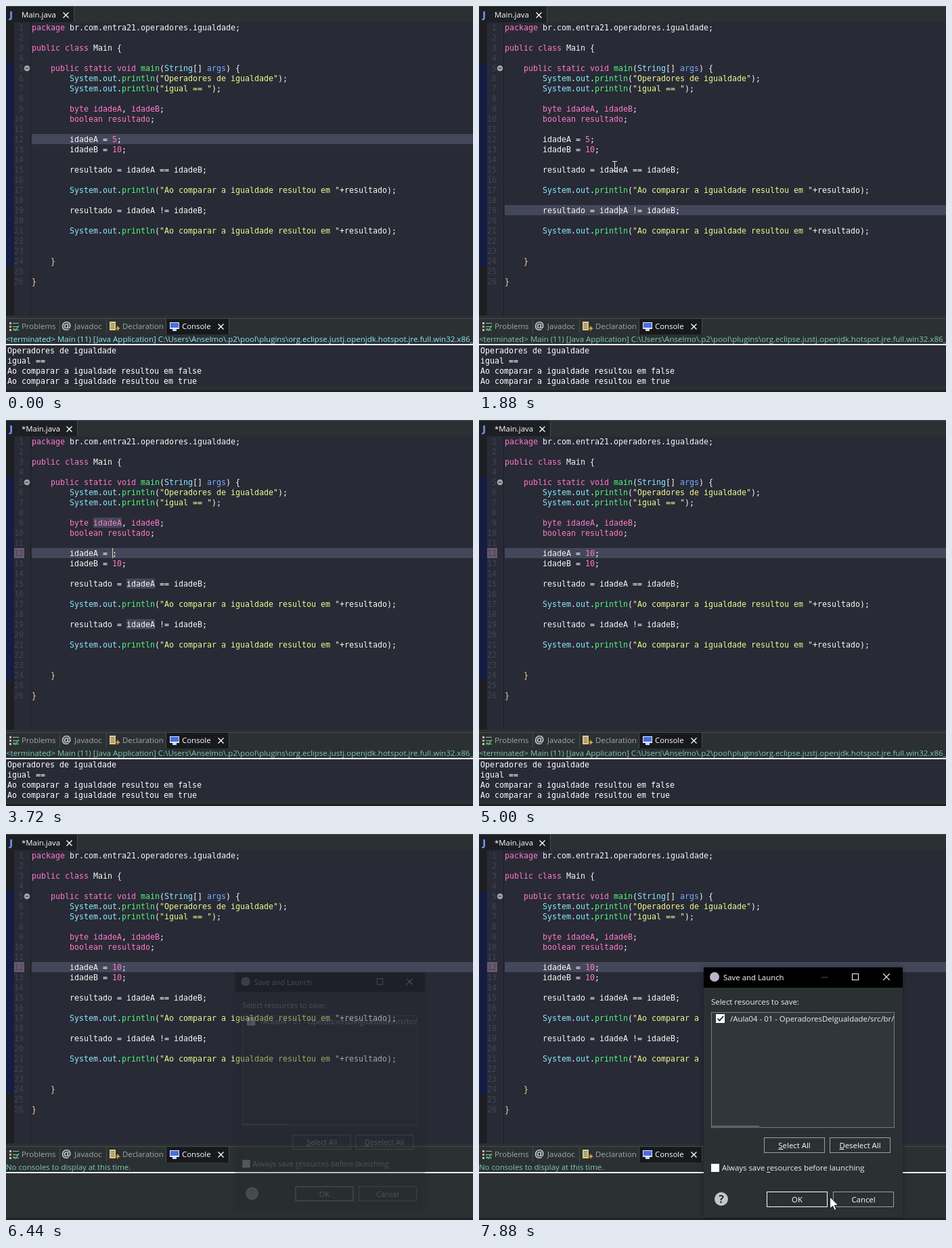
Recreate the animation shown at these times as an HTML page with a canvas. Size 690 px wide and 570 px high, loop 8000 ms.

```html
<!DOCTYPE html>
<html lang="pt">
<head>
<meta charset="utf-8">
<title>Operadores de igualdade</title>
<style>
  html, body { margin: 0; width: 100%; height: 100%; overflow: hidden; background: #2b3033; }
  canvas { display: block; }
</style>
</head>
<body>
<canvas id="stage" width="690" height="570"></canvas>
<script>
const ctx = document.getElementById('stage').getContext('2d');
const LOOP = 8000, CHAR = 7, ROW = 15, LEFT = 38, TOP = 24;
const MONO = '11.63px "DejaVu Sans Mono", monospace';
const UI = '11.4px "Open Sans", sans-serif';
const PANEL = '#2b3033', EDITOR = '#282a36', MARK = '#44475a', WHITE = '#f8f8f2', BORDER = '#464b4e';

const source = value => `package br.com.entra21.operadores.igualdade;

public class Main {

    public static void main(String[] args) {
        System.out.println("Operadores de igualdade");
        System.out.println("igual == ");

        byte idadeA, idadeB;
        boolean resultado;

        idadeA = ${value};
        idadeB = 10;

        resultado = idadeA == idadeB;

        System.out.println("Ao comparar a igualdade resultou em "+resultado);

        resultado = idadeA != idadeB;

        System.out.println("Ao comparar a igualdade resultou em "+resultado);


    }

}`.split('\n');

const output = ['Operadores de igualdade', 'igual == ',
  'Ao comparar a igualdade resultou em false', 'Ao comparar a igualdade resultou em true'];

const launched = '<terminated> Main (11) [Java Application] C:\\Users\\Anselmo\\.p2\\pool\\plugins\\' +
  'org.eclipse.justj.openjdk.hotspot.jre.full.win32.x86_64';

const PINK = '#ff79c6', CYAN = '#8be9fd', GREEN = '#50fa7b';
const tokenColor = {
  package: PINK, public: PINK, class: PINK, static: PINK, void: PINK,
  System: CYAN, out: CYAN, String: CYAN, println: GREEN, main: GREEN,
  args: '#79abff', '}': '#f5cf95'
};

// Timed states: [start, ...values]; the latest one that has started applies.
const carets = [[0], [1570, 19, 207], [2160], [2460, 12, 157], [2750, 12, 164], [3290],
  [3720, 12, 157], [3870, 12, 171], [4860], [5400, 12, 171], [5940]];
const beams = [[0], [1270, 260, 420], [1420, 225, 340], [1570, 208, 302], [1730, 205, 272],
  [1880, 200, 236], [2030, 183, 212], [2160, 168, 194], [2310, 161, 189], [2750, 164, 189],
  [3040, 165, 189], [3720], [4430, 160, 184], [4580, 122, 152], [4720, 87, 118], [4860]];
const values = [[0, '5'], [3720, ''], [3870, '10']];
const dialogs = [[0], [6440, 0.2, 0.954], [6570, 0.85, 0.99], [6710, 1, 1]];
const current = (states, t) => states.findLast(s => s[0] <= t).slice(1);

function box(x, y, w, h, color) {
  ctx.fillStyle = color;
  ctx.fillRect(x, y, w, h);
}
function frame(x, y, w, h, color) {
  ctx.strokeStyle = color;
  ctx.lineWidth = 1;
  ctx.strokeRect(x + 0.5, y + 0.5, w - 1, h - 1);
}
function text(s, x, y, color, font = UI, align = 'left') {
  ctx.font = font;
  ctx.textAlign = align;
  ctx.fillStyle = color;
  ctx.fillText(s, x, y);
}
function line(points, color, width = 1) {
  ctx.strokeStyle = color;
  ctx.lineWidth = width;
  ctx.beginPath();
  points.forEach(([x, y]) => ctx.lineTo(x, y));
  ctx.stroke();
}
function disc(x, y, r, color) {
  ctx.fillStyle = color;
  ctx.beginPath();
  ctx.arc(x, y, r, 0, Math.PI * 2);
  ctx.fill();
}
function cross(x, y, r, color = '#fff') {
  line([[x - r, y - r], [x + r, y + r]], color, 1.2);
  line([[x + r, y - r], [x - r, y + r]], color, 1.2);
}
const rowTop = row => TOP + (row - 1) * ROW;

function drawEditorTab(dirty) {
  const edge = dirty ? 105 : 100;
  box(0, 0, 690, 24, PANEL);
  box(0, 0, 690, 1, BORDER);
  box(0, 1, edge, 23, '#1c1f23');
  box(edge, 1, 1, 23, BORDER);
  text('J', 5, 18, '#7090f0', 'bold 14px "DejaVu Sans", sans-serif');
  text(dirty ? '*Main.java' : 'Main.java', 23, 17, '#fff');
  cross(dirty ? 93.5 : 88.5, 13.5, 4);
}

function drawCodeLine(s, row) {
  const declaration = /^\s*(byte|boolean)/.test(s);
  for (const m of s.matchAll(/"[^"]*"|\w+|[^\w\s]/g)) {
    const token = m[0];
    let color = tokenColor[token] || WHITE;
    if (token[0] === '"') color = '#f1fa8c';
    else if (/^\d/.test(token) || (declaration && /\w/.test(token))) color = PINK;
    text(token, LEFT + m.index * CHAR, rowTop(row) + 12, color, MONO);
  }
}

function drawEditor(t) {
  const dirty = t >= 3720;
  const activeRow = t >= 1570 && t < 2460 ? 19 : 12;
  box(0, 24, 690, 433, EDITOR);
  box(0, 24, 12, 433, '#1d1f23');
  box(0, 84, 12, 300, '#161d42');
  box(36, 24, 1, 433, '#1b1d24');
  box(LEFT, rowTop(activeRow), 652, ROW, MARK);
  if (dirty) box(12, rowTop(12), 15, ROW, '#6b5872');
  if (t >= 2460 && t < 4860)
    for (const [row, x] of [[9, 129], [15, 178], [19, 178]]) box(x, rowTop(row), 42, ROW, MARK);

  source(current(values, t)[0]).forEach((s, i) => {
    text(i + 1, 26, rowTop(i + 1) + 12, '#424550', MONO, 'right');
    drawCodeLine(s, i + 1);
  });
  disc(31, 92, 4.3, '#a5a8aa');
  box(28.5, 91.5, 5, 1, '#25272e');

  const [row, x] = current(carets, t);
  if (row) box(x, rowTop(row), 1, ROW, '#e8d9a8');
}

function drawViewIcons() {
  for (const y of [467, 472, 477]) {
    box(5, y, 3, 3, y === 472 ? '#d9b04a' : '#b9c0c4');
    box(10, y + 1, 9, 1, '#aab2b6');
  }
  line([[11, 476], [14, 479], [19, 472]], '#45b45c', 2);
  text('@', 82, 478, '#c0c8d4', 'bold 16px "Open Sans", sans-serif');
  box(153, 466, 9, 13, '#d6c48c');
  for (const y of [469, 472, 475]) box(155, y, 5, 1, '#655d45');
  line([[160, 476], [167, 476], [164, 473], [167, 476], [164, 479]], '#e0a83c', 1.5);
  box(242, 467, 14, 10, '#dfe5f5');
  box(243, 468, 12, 7, '#4a6ee0');
  box(246, 477, 6, 3, '#cfd6e8');
}

function drawConsole(t) {
  const cleared = t >= 6320;
  box(0, 457, 690, 113, PANEL);
  box(0, 461, 690, 1, BORDER);
  box(237, 462, 92, 23, '#17191c');
  for (const x of [79, 148, 236, 329]) box(x, 462, 1, 22, BORDER);
  drawViewIcons();
  text('Problems', 23, 477, '#a3a8aa');
  text('Javadoc', 101, 477, '#a3a8aa');
  text('Declaration', 172, 477, '#a3a8aa');
  text('Console', 260, 477, '#fff');
  cross(317.5, 473.5, 4);

  const status = t < 1570 ? '#8be9fd' : '#7accb6';
  if (cleared) {
    text('No consoles to display at this time.', 0, 496, status);
  } else {
    text(launched, 0, 496, status, '11.5px "Open Sans", sans-serif');
    box(0, 500, 690, 61, EDITOR);
    output.forEach((s, i) => text(s, 2, 513 + i * ROW, '#fff', MONO));
  }
  box(0, 499, 690, 2, '#f2f2f2');
  box(0, 567, 690, 3, '#1f2326');
}

function button(label, x, y, color, underlined) {
  frame(x, y, 90, 23, color);
  text(label, x + 45, y + 16, '#fff', UI, 'center');
  if (underlined) box(x + 45 - ctx.measureText(label).width / 2, y + 17, 7, 1, '#fff');
}

function drawDialog(t) {
  const [alpha, scale] = current(dialogs, t);
  if (!alpha) return;
  ctx.save();
  ctx.globalAlpha = alpha;
  ctx.translate(478.5, 381.5 - (1 - scale) * 20);
  ctx.scale(scale, scale);
  ctx.translate(-478.5, -381.5);

  ctx.save();
  ctx.shadowColor = 'rgba(0,0,0,.35)';
  ctx.shadowBlur = 8;
  box(332, 197, 294, 369, PANEL);
  ctx.restore();
  box(332, 197, 294, 30, '#000');
  disc(348, 211, 7, '#b9b5c8');
  text('Save and Launch', 361, 216, '#fff');
  box(506, 211, 10, 1, '#4a4a4a');
  frame(551, 206, 10, 10, '#fff');
  cross(602, 211, 4.8);

  text('Select resources to save:', 343, 252, '#f0f0f0');
  box(343, 263, 271, 171, '#30363a');
  frame(343, 263, 271, 171, '#777c7f');
  box(350, 266, 13, 13, '#fff');
  line([[352.5, 272.5], [355.5, 275.5], [361, 269]], '#111', 1.6);
  ctx.save();
  ctx.beginPath();
  ctx.rect(344, 264, 269, 169);
  ctx.clip();
  text('/Aula04 - 01 - OperadoresDeIgualdade/src/br/', 371, 277, '#f0f0f0');
  ctx.restore();
  box(344, 431, 70, 1, '#888d90');

  button('Select All', 421, 448, '#9b9fa1', true);
  button('Deselect All', 518, 448, '#9b9fa1', true);
  box(343, 487, 12, 12, '#fff');
  text('Always save resources before launching', 359, 497, '#f0f0f0');
  box(359 + ctx.measureText('Always save ').width, 499, 5, 1, '#f0f0f0');
  disc(358, 539, 10, '#c3c7c9');
  text('?', 358, 545, PANEL, 'bold 16px "Open Sans", sans-serif', 'center');
  button('OK', 425, 528, '#fff');
  button('Cancel', 523, 528, '#9b9fa1');
  ctx.restore();
}

function drawBeam(x, y) {
  line([[x + 0.5, y - 6], [x + 0.5, y + 7]], '#e6e6e6');
  for (const dy of [-6.5, 7.5]) line([[x - 3, y + dy], [x + 4, y + dy]], '#e6e6e6');
}

function drawArrow(t) {
  if (t < 7000) return;
  const step = Math.min(6, Math.floor((t - 7000) / 146.5));
  const p = 1 - (1 - step / 6) ** 2;
  ctx.save();
  ctx.translate(175 + 343 * p, 234 + 302 * p);
  ctx.beginPath();
  [[0, 0], [0, 17], [4, 13.5], [7, 19.5], [9.5, 18.5], [6.8, 12.5], [12, 12]]
    .forEach(([x, y]) => ctx.lineTo(x + 0.5, y));
  ctx.closePath();
  ctx.fillStyle = '#fff';
  ctx.fill();
  ctx.strokeStyle = '#000';
  ctx.lineWidth = 0.8;
  ctx.stroke();
  ctx.restore();
}

function draw(now) {
  const t = now % LOOP;
  drawEditorTab(t >= 3720);
  drawEditor(t);
  drawConsole(t);
  const [x, y] = current(beams, t);
  if (x) drawBeam(x, y);
  drawDialog(t);
  drawArrow(t);
}

const start = performance.now();
function tick() {
  draw(performance.now() - start);
  requestAnimationFrame(tick);
}
tick();
</script>
</body>
</html>
```
